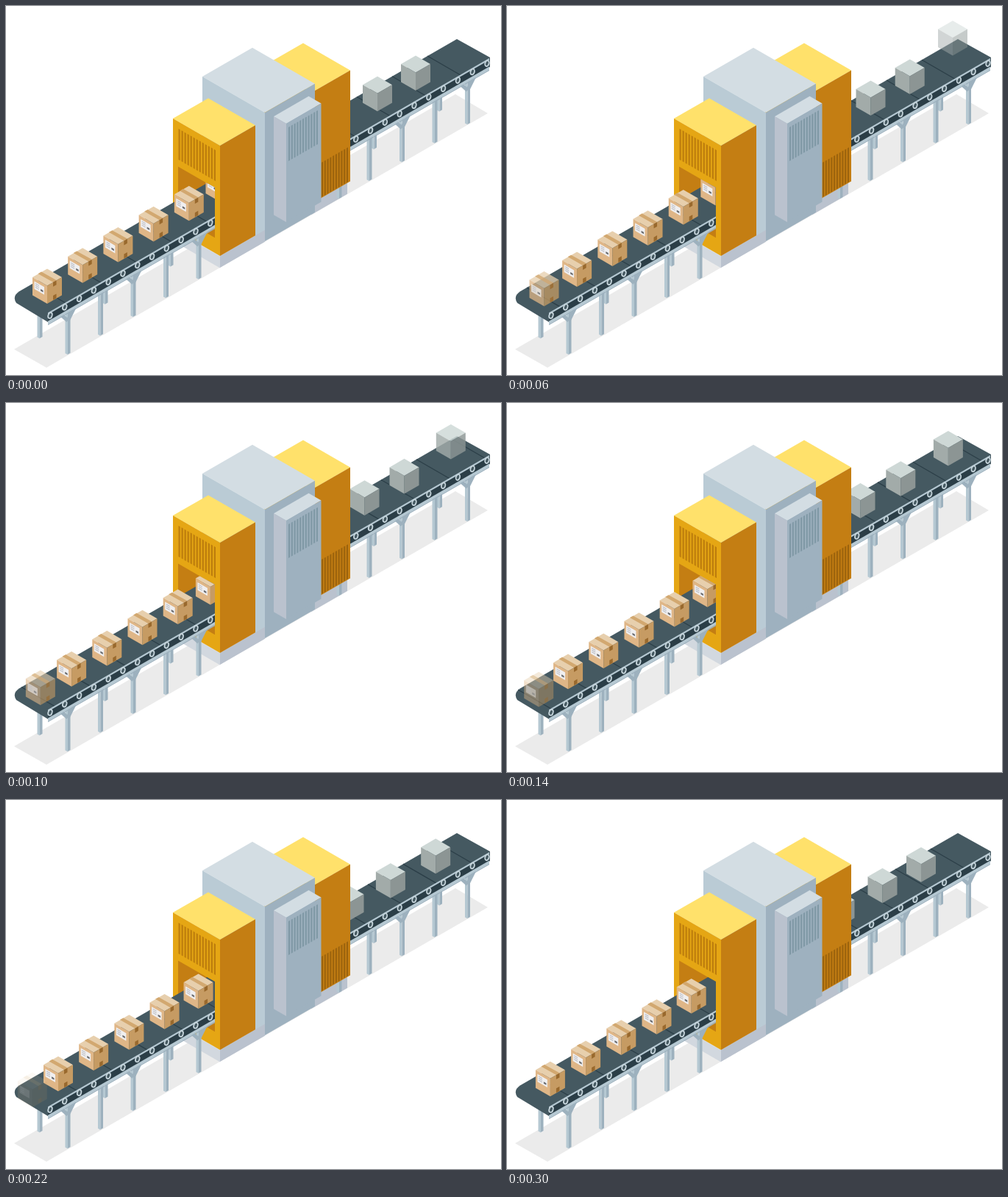
These frames come from a looping animation (673x502 px, 320 ms). An HTML page with a canvas:

```html
<!DOCTYPE html>
<html lang="en">
<head>
<meta charset="utf-8">
<title>Packing line</title>
<style>
html, body { margin: 0; width: 100%; height: 100%; overflow: hidden; background: #fff; }
canvas { display: block; }
</style>
</head>
<body>
<canvas id="stage" width="673" height="502"></canvas>
<script>
const ctx = document.getElementById('stage').getContext('2d');
const STEP = 20, STEPS = 16, SLOPE = 0.577;
const STEEL = '#b5c8d2', STEEL_DARK = '#9db1be', BELT = '#455961', BELT_DARK = '#2b3e47';
const SILVER = '#d3dde3', SLATE = '#9eb1bf', PALE = '#bac2ce';
const YELLOW = '#ffe16b', AMBER = '#e5a614', ORANGE = '#c47e13';

// Front and back edges of the belt surface
const front = x => 70 + (658 - x) * SLOPE;
const back = x => 45 + (613 - x) * SLOPE;

function poly(color, ...p) {
  ctx.beginPath();
  for (let i = 0; i < p.length; i += 2) ctx.lineTo(p[i], p[i + 1]);
  ctx.closePath();
  ctx.fillStyle = color;
  ctx.fill();
}
function line(color, width, x1, y1, x2, y2) {
  ctx.beginPath();
  ctx.moveTo(x1, y1);
  ctx.lineTo(x2, y2);
  ctx.strokeStyle = color;
  ctx.lineWidth = width;
  ctx.stroke();
}

// Upright sheared face; (x, y) is its top left corner
function wall(color, x, y, w, h, slope = SLOPE) {
  const d = w * slope;
  poly(color, x, y, x + w, y + d, x + w, y + d + h, x, y + h);
}
// Isometric block; (x, y) is the top corner nearest the viewer
function block(x, y, a, b, h, top, left, right) {
  const da = a * SLOPE, db = b * SLOPE;
  poly(top, x, y, x + b, y - db, x + b - a, y - db - da, x - a, y - da);
  wall(left, x - a, y - da, a, h);
  wall(right, x, y, b, h, -SLOPE);
}
function vent(color, count, x, y, w, h, slope) {
  const pitch = w / (count - 0.45);
  for (let i = 0; i < count; i++)
    wall(color, x + i * pitch, y + i * pitch * slope, pitch * 0.55, h, slope);
}

function leg(x, top, bottom) {
  wall(STEEL, x - 3.5, top, 3.5, bottom - top - 1.5);
  wall(STEEL_DARK, x, top, 3.5, bottom - top, -SLOPE);
}
function legs(first) {
  for (let i = 0; i < 5; i++) {
    const x = first + i * 44.5, top = front(x) + 12;
    if (i % 2) leg(x + 6.5, top, top + 18);
    leg(x, top, 474 - (x - 84) * 0.576);
    if (i % 2) continue;
    line(STEEL_DARK, 5, x - 9, top + 7, x, top + 15);
    line(STEEL_DARK, 5, x + 9, top - 3, x, top + 15);
  }
}

function conveyor(firstLeg, firstSeam, n) {
  legs(firstLeg);
  ctx.beginPath();
  ctx.moveTo(613, 45);
  ctx.lineTo(658, 70);
  ctx.lineTo(658, 83);
  ctx.lineTo(57, 430);
  ctx.lineTo(14, 404);
  ctx.quadraticCurveTo(8, 395, 18, back(18));
  ctx.fillStyle = BELT;
  ctx.fill();
  for (let x = firstSeam - 3 * n; x < 612; x += 48)
    if (x > 14) line(BELT_DARK, 1.2, x, back(x), x + 45, back(x) + 26);

  const rail = (color, from, to) => wall(color, 57, front(57) + from, 600, to - from, -SLOPE);
  rail(BELT_DARK, 2, 13);
  rail(STEEL, 0.5, 3);
  rail(STEEL, 12, 16);
  rail(STEEL_DARK, 16, 17.5);
  for (let k = 0; k <= 30; k++) {
    ctx.beginPath();
    ctx.ellipse(60 + 19.8 * k, 421 - 11.43 * k, 2.6, 4, 0.3, 0, 7);
    ctx.fillStyle = BELT;
    ctx.fill();
    ctx.strokeStyle = '#c5d4db';
    ctx.lineWidth = 1.8;
    ctx.stroke();
  }
}

// Draws a box whose bounding corner is at (x, y)
function place(draw, x, y, alpha = 1) {
  ctx.save();
  ctx.translate(x, y);
  ctx.globalAlpha = Math.min(1, alpha);
  draw();
  ctx.restore();
}
function blank() {
  block(20, 23.5, 20, 20, 24.5, '#ced8d6', '#a2aba9', '#8c9594');
}
function parcel() {
  block(20, 23.5, 20, 20, 24.5, '#e7cfad', '#dfb687', '#c69b63');
  poly('#d2a870', 7.5, 7.2, 12, 4.6, 32.5, 16, 28, 18.8);
  for (const y of [18.8, 37]) wall('#99692d', 28, y, 4.5, 6, -SLOPE);
  wall('#f0eff0', 2.5, 17.5, 13.5, 10.5);
  for (const y of [20, 22.5, 25]) wall('#b9bcc4', 4, y, 5, 1.2);
  wall('#6a6c70', 11, 28, 3.5, 2.5);
}

function machine() {
  // Rear module
  wall(PALE, 415, 268, 49, 16, -SLOPE);
  leg(453, 246, 262);
  block(415, 118, 64, 53, 151, YELLOW, AMBER, ORANGE);
  vent('#9b630d', 10, 429, 213, 36, 47, -SLOPE);

  // Central tower and its cabinet
  block(352, 145, 85, 68, 175, SILVER, '#bacbd5', SLATE);
  block(381, 160, 17, 47.5, 134, SILVER, PALE, SLATE);
  vent('#7f98a5', 11, 384, 165, 40, 46, -SLOPE);

  // Front module on its plinth
  wall('#d2d8df', 240, 311, 51, 16);
  wall(PALE, 291, 340, 61, 16, -SLOPE);
  block(291, 190, 64, 48, 150, YELLOW, AMBER, ORANGE);
  vent('#bd7d0d', 13, 234.5, 167, 50.5, 42, SLOPE);
  wall(ORANGE, 234, 218.5, 50, 68);
}

// A blank falls onto the belt, then speeds up along it
function drop(n) {
  const x = 586 - 49 * Math.max(0, (n - 4) / 12) ** 1.5;
  const falling = 15 + 4.5 * (n - 2), onBelt = 67 + (537 - x) * 0.545;
  place(blank, x, Math.min(falling, onBelt), n * 0.165);
}

function feedLine(n) {
  conveyor(449.5, 45, n);
  if (n > 1) drop(n);
  for (let i = 0; i < 2; i++) {
    const travel = 52 * i + (3.1 + 0.4 * i) * n;
    place(blank, 537 - travel, 67 + travel * 0.545);
  }
}

function exitLine(n) {
  // Visible area ends at the doorway
  ctx.save();
  ctx.beginPath();
  for (const [x, y] of [[0, 88], [284, 247], [284, 502], [0, 502]]) ctx.lineTo(x, y);
  ctx.clip();
  leg(46, 415, 452);
  conveyor(84, 36, n);
  place(parcel, 271.5 - 2.72 * n, 218.5 + 1.6 * n);
  for (let i = 4; i > 0; i--) {
    const travel = 48.2 * i - 3.02 * n;
    place(parcel, 36 + travel, 357 - travel * 0.585);
  }
  if (n < 13) place(parcel, 36 - 1.83 * n, 357 + 1.2 * n, 1 - n * 0.08);
  ctx.restore();
}

function render(n) {
  ctx.fillStyle = '#fff';
  ctx.fillRect(0, 0, 673, 502);
  poly('#ebebeb', 11, 467, 55, 492, 655, 146, 611, 120);
  ctx.save();
  ctx.beginPath();
  ctx.rect(440, 0, 233, 502);
  ctx.clip();
  feedLine(n);
  ctx.restore();
  machine();
  exitLine(n);
}

function tick() {
  render(Math.floor(performance.now() / STEP) % STEPS);
  requestAnimationFrame(tick);
}
tick();
</script>
</body>
</html>
```
